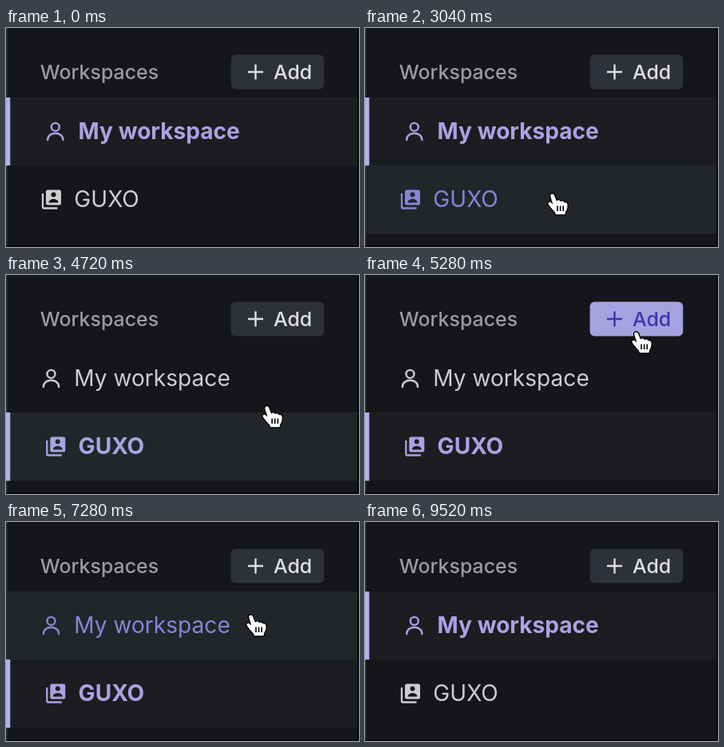
These frames come from a looping animation (442 px wide and 274 px high, 9.6 s). An HTML page with a canvas:

```html
<!DOCTYPE html>
<html lang="en">
<head>
<meta charset="utf-8">
<title>Workspace switcher</title>
<style>
html, body { margin: 0; width: 100%; height: 100%; overflow: hidden; background: #151619; }
canvas { display: block; width: 442px; height: 274px; }
</style>
</head>
<body>
<canvas id="stage" width="442" height="274"></canvas>
<script>
const ctx = document.getElementById('stage').getContext('2d');
const LOOP = 9600;
const FONT = 'Inter, "Open Sans", sans-serif';
const ROW = 85.4;
const PICK_TEAM = 3920, PICK_MINE = 7680;

// Pointer tip: time, x, y
const track = [
  [0, 238, -40], [640, 238, -40], [1120, 235, 112], [1520, 235, 112],
  [1840, 249, 188], [2160, 235, 207], [4240, 235, 207], [4720, 327, 164],
  [4880, 335, 130], [5160, 340, 71], [6920, 340, 71], [7240, 307, 116],
  [7600, 307, 116], [8000, 328, 114], [8640, 328, 114], [9280, -34, 112],
  [LOOP, -34, 112]
];

const still = (a, b) => a[1] === b[1] && a[2] === b[2];

function slope(i, axis) {
  const a = track[i - 1], b = track[i], c = track[i + 1];
  if (!a || !c || still(a, b) || still(b, c)) return 0;
  return (c[axis] - a[axis]) / (c[0] - a[0]);
}

function pointer(t) {
  t = Math.max(0, t);
  let i = 0;
  while (i < track.length - 2 && t >= track[i + 1][0]) i++;
  const a = track[i], b = track[i + 1], d = b[0] - a[0], u = (t - a[0]) / d;
  const s = u * u * (3 - 2 * u);
  const h0 = u * (1 - u) * (1 - u) * d, h1 = u * u * (u - 1) * d;
  return [1, 2].map(k => a[k] + (b[k] - a[k]) * s + h0 * slope(i, k) + h1 * slope(i + 1, k));
}

function hit([x, y]) {
  if (x < 0) return '';
  if (y >= 87 && y < 172) return 'mine';
  if (y >= 172 && y < 257) return 'team';
  return x > 282 && x < 398 && y > 34 && y < 77 ? 'add' : '';
}

// Averaging recent hits gives each hover a short fade
function hover(t, name) {
  let n = 0;
  for (let lag = 80; lag <= 140; lag += 20) n += hit(pointer(t - lag)) === name;
  return n / 4;
}

function mix(a, b, k) {
  return `rgb(${a.map((v, i) => Math.round(v + (b[i] - v) * k)).join(',')})`;
}

function text(str, x, y, size, color, weight) {
  ctx.font = `${weight} ${size}px ${FONT}`;
  ctx.fillStyle = color;
  ctx.fillText(str, x, y);
}

function box(x, y, w, h, r, color) {
  ctx.fillStyle = color;
  ctx.beginPath();
  ctx.roundRect(x, y, w, h, r);
  ctx.fill();
}

function personIcon(x, y, color) {
  ctx.strokeStyle = color;
  ctx.lineWidth = 2.4;
  ctx.lineCap = 'round';
  ctx.beginPath();
  ctx.arc(x, y - 5.6, 5, 0, Math.PI * 2);
  ctx.moveTo(x - 9.6, y + 10.5);
  ctx.bezierCurveTo(x - 9.6, y - 0.5, x + 9.6, y - 0.5, x + 9.6, y + 10.5);
  ctx.stroke();
}

function contactsIcon(x, y, color, back) {
  box(x - 6.5, y - 12, 19, 19, 2.5, color);
  ctx.strokeStyle = color;
  ctx.lineWidth = 2.3;
  ctx.lineCap = 'butt';
  ctx.beginPath();
  ctx.moveTo(x - 10.5, y - 7.5);
  ctx.lineTo(x - 10.5, y + 9.5);
  ctx.quadraticCurveTo(x - 10.5, y + 11, x - 9, y + 11);
  ctx.lineTo(x + 8, y + 11);
  ctx.stroke();
  ctx.fillStyle = back;
  ctx.beginPath();
  ctx.arc(x + 3, y - 6, 3, 0, Math.PI * 2);
  ctx.fill();
  ctx.beginPath();
  ctx.moveTo(x - 3, y + 4);
  ctx.bezierCurveTo(x - 3, y - 2, x + 9, y - 2, x + 9, y + 4);
  ctx.fill();
}

function row(top, label, icon, selected, over) {
  const back = mix(selected ? [28, 29, 33] : [21, 22, 25], [34, 38, 42], over);
  const color = selected ? '#aaa2e3' : mix([205, 205, 208], [140, 130, 216], over);
  const shift = selected ? 5.3 : 0;
  ctx.fillStyle = back;
  ctx.fillRect(2, top, 438, ROW);
  if (selected) {
    ctx.fillStyle = '#b5afee';
    ctx.fillRect(0, top, 5.3, ROW);
  }
  icon(56.5 + shift, top + 42.5, color, back);
  text(label, 85.3 + shift, top + 52.4, 28.1, color, selected ? 700 : 400);
}

function addButton(over) {
  const ink = mix([224, 224, 228], [64, 52, 168], over);
  box(281.6, 33.6, 116.6, 42.9, 6, mix([47, 49, 56], [168, 161, 224], over));
  ctx.strokeStyle = ink;
  ctx.lineWidth = 2.4;
  ctx.lineCap = 'butt';
  ctx.beginPath();
  ctx.moveTo(303, 55);
  ctx.lineTo(322, 55);
  ctx.moveTo(312.5, 45.5);
  ctx.lineTo(312.5, 64.5);
  ctx.stroke();
  text('Add', 335, 64, 24.9, ink, 500);
}

const hand = new Path2D(`M-2.6 4C-3.8 .3 .6-1 2 2.4L4.8 9.6C6.4 8 9.3 8.4 10 10.2
  C11.5 8.8 14 9.6 14.6 11.5C16.5 10.5 18.7 12 18.5 14.5C18.5 18.5 17.8 20.5 16 23L15.5 26.3H3.8L3 23.5
  C0 21-3 17-5.2 13.8C-6.5 11.3-3.8 9.6-1.4 12L.4 13.6Z`);
const creases = new Path2D('M6 15.5V22M9.6 15.5V22M13.2 15.5V22');
const arrow = new Path2D('M0 0V24L5.5 19L9.5 27.5L13.5 25.8L9.8 17.5H17Z');

function cursor(x, y, linking) {
  const shape = linking ? hand : arrow;
  ctx.save();
  ctx.translate(x, y);
  ctx.lineJoin = 'round';
  ctx.lineWidth = linking ? 2.8 : 3;
  ctx.strokeStyle = linking ? '#000' : '#fff';
  ctx.fillStyle = linking ? '#fff' : '#000';
  ctx.stroke(shape);
  ctx.fill(shape);
  if (linking) {
    ctx.lineWidth = 1.6;
    ctx.stroke(creases);
  }
  ctx.restore();
}

function draw(t) {
  ctx.fillStyle = '#151619';
  ctx.fillRect(0, 0, 442, 274);
  ctx.fillStyle = '#2b2c30';
  ctx.fillRect(0, 0, 2, 274);

  text('Workspaces', 42.8, 64, 24.9, '#9b9ca0', 500);
  addButton(hover(t, 'add'));
  const team = t >= PICK_TEAM && t < PICK_MINE;
  row(87, 'My workspace', personIcon, !team, hover(t, 'mine'));
  row(172, 'GUXO', contactsIcon, team, hover(t, 'team'));

  ctx.fillStyle = '#0b0b0d';
  ctx.fillRect(440, 0, 2, 274);
  ctx.fillRect(0, 272, 442, 2);

  const tip = pointer(t);
  cursor(...tip, hit(tip) !== '' || tip[0] < 0);
}

function tick() {
  draw(performance.now() % LOOP);
  requestAnimationFrame(tick);
}
tick();
</script>
</body>
</html>
```
